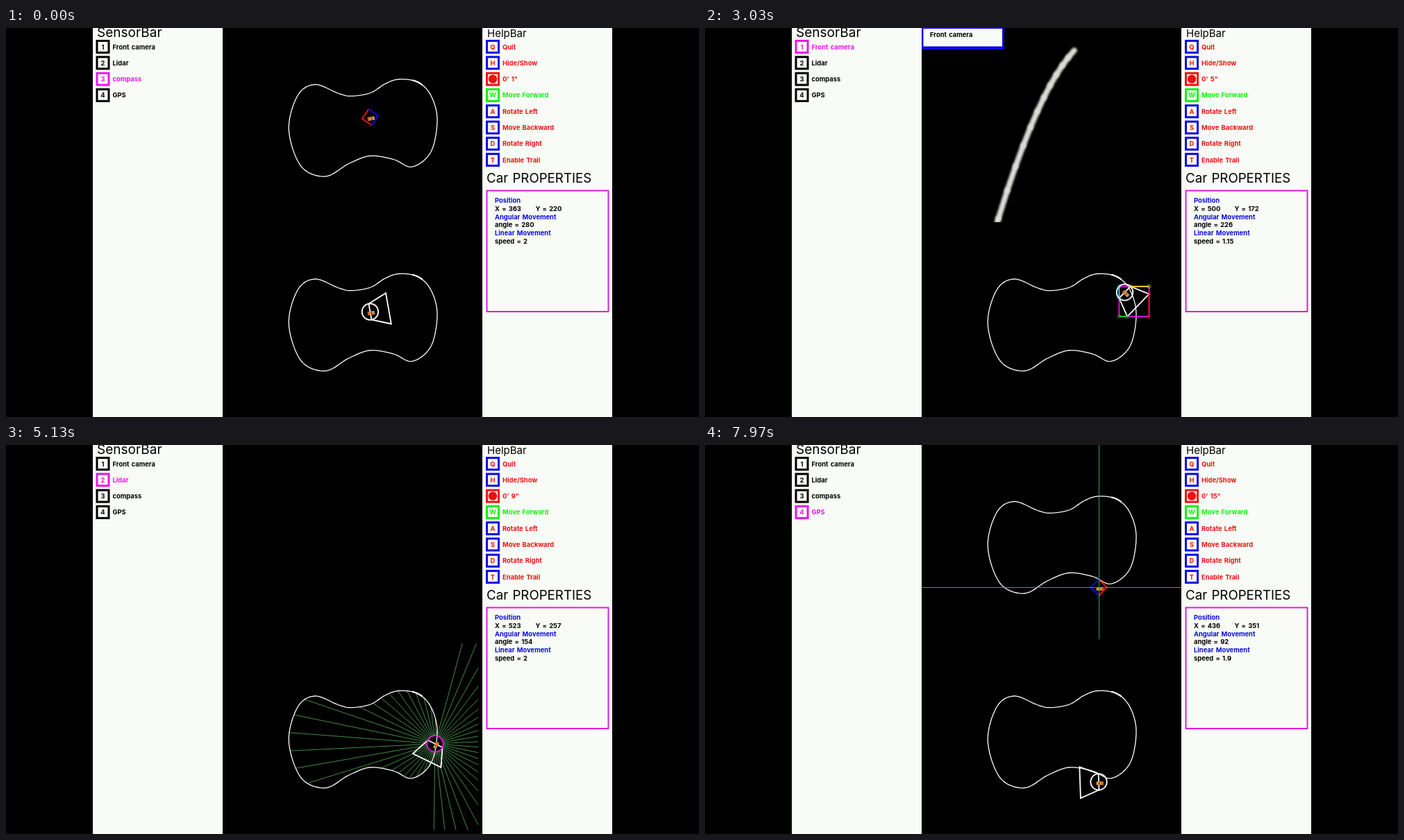
Animation, 998 px wide and 561 px high, one loop 8000 ms. Source, as an HTML page with a canvas:

```html
<!DOCTYPE html>
<html>
<head>
<meta charset="utf-8">
<style>
  html, body { margin: 0; width: 100%; height: 100%; overflow: hidden; background: #000; }
  canvas { display: block; }
</style>
</head>
<body>
<canvas id="stage" width="998" height="561"></canvas>
<script>
const ctx = document.getElementById('stage').getContext('2d');
const LOOP = 8000, SCALE = 0.585, LEFT = 312, RIGHT = 686, MIDDLE = 280.5;
const TURN_RATE = 0.06; // degrees per ms
const WHITE = '#fff', PAPER = '#f9fcf6', BLACK = '#000', BLUE = '#0a0ae2', RED = '#ee1212',
      GREEN = '#10f210', MAGENTA = '#ec14ec', PANEL = '#dc1edc', RAY = '#4b9c4d';
const CORNER_COLORS = ['#10e0e0', '#f2ea10', RED, '#10d820'];

// Key points of the track in the lower view, clockwise
const outline = [
  [445, 362], [478, 374.5], [497, 378.7], [525, 374], [546, 361], [566, 354.5], [593, 358.5],
  [612, 378], [621, 413], [612, 459], [585, 480.7], [558, 470], [524, 465], [493, 476.5],
  [460, 494.5], [425, 480], [407.3, 427], [420, 378]];

// The car drives smoothly between these stops; the turn to the next angle begins at turnFrom
const stops = [
  { t: 0, X: 363, Y: 220, angle: 280, speed: 2, clock: 1.5, turnFrom: 100 },
  { t: 1430, X: 425, Y: 171, angle: 310, speed: 2, clock: 3.5, turnFrom: 1530 },
  { t: 3030, X: 500, Y: 172, angle: 226, speed: 1.15, clock: 5.6, turnFrom: 3600 },
  { t: 4070, X: 522, Y: 198, angle: 202, speed: 1.1, clock: 8.2, turnFrom: 4200 },
  { t: 5130, X: 523, Y: 257, angle: 154, speed: 2, clock: 9.4, turnFrom: 5600 },
  { t: 5900, X: 505, Y: 292, angle: 172, speed: 2, clock: 10.6, turnFrom: 6450 },
  { t: 7970, X: 436, Y: 351, angle: 92, speed: 1.9, clock: 15.4 }];

const CAMERA = 1, LIDAR = 2, COMPASS = 3, GPS = 4;
const modes = [[0, COMPASS], [560, LIDAR], [1130, CAMERA], [3700, LIDAR], [6270, COMPASS], [7700, GPS]];

const mix = (a, b, k) => a + (b - a) * k;
const radians = degrees => degrees * Math.PI / 180;
const headingOf = angle => radians(270 - angle);

// Hermite path whose tangents follow the heading
function stateAt(t) {
  const i = stops.findLastIndex((stop, n) => stop.t <= t && n < stops.length - 1);
  const a = stops[i], b = stops[i + 1], k = (t - a.t) / (b.t - a.t);
  const reach = 1.05 * Math.hypot(b.X - a.X, b.Y - a.Y);
  const along = (axis, trig) => {
    const k2 = k * k, k3 = k2 * k;
    return (2 * k3 - 3 * k2 + 1) * a[axis] + (3 * k2 - 2 * k3) * b[axis] +
      reach * ((k3 - 2 * k2 + k) * trig(headingOf(a.angle)) + (k3 - k2) * trig(headingOf(b.angle)));
  };
  const X = along('X', Math.cos), Y = along('Y', Math.sin);

  const change = b.angle - a.angle, turned = (t - a.turnFrom) * TURN_RATE;
  const turning = turned > 0 && turned < Math.abs(change);
  const angle = a.angle + Math.sign(change) * Math.max(0, Math.min(turned, Math.abs(change)));
  return {
    X, Y, x: LEFT + X * SCALE, y: MIDDLE + Y * SCALE, angle, heading: headingOf(angle),
    activeKey: !turning ? 'W' : change > 0 ? 'A' : 'D',
    speed: Math.round(mix(a.speed, b.speed, k) * 20) / 20,
    seconds: Math.floor(mix(a.clock, b.clock, k)),
    mode: modes.findLast(m => m[0] <= t)[1]
  };
}

function smoothLoop(points, steps) {
  const n = points.length;
  return points.flatMap((p1, i) => {
    const p0 = points[(i + n - 1) % n], p2 = points[(i + 1) % n], p3 = points[(i + 2) % n];
    return Array.from({ length: steps }, (_, s) => {
      const u = s / steps;
      return [0, 1].map(c => p1[c] + 0.5 * u * (p2[c] - p0[c] +
        u * (2 * p0[c] - 5 * p1[c] + 4 * p2[c] - p3[c] + u * (3 * (p1[c] - p2[c]) + p3[c] - p0[c]))));
    });
  });
}
const track = smoothLoop(outline, 10);
const isThick = ([x, y]) => x > 584 && x < 600 && y < 363;

function line(points, color, width, closed) {
  ctx.beginPath();
  points.forEach(p => ctx.lineTo(p[0], p[1]));
  if (closed) ctx.closePath();
  ctx.strokeStyle = color;
  ctx.lineWidth = width;
  ctx.stroke();
}

function ring(x, y, r, color, width) {
  ctx.beginPath();
  ctx.arc(x, y, r, 0, 7);
  ctx.strokeStyle = color;
  ctx.lineWidth = width;
  ctx.stroke();
}

function box(x, y, w, h, color, width) {
  ctx.strokeStyle = color;
  ctx.lineWidth = width;
  ctx.strokeRect(x, y, w, h);
}

function text(string, x, y, color = BLACK, font = '700 9.4px', align = 'left') {
  ctx.font = font + ' Inter, sans-serif';
  ctx.textAlign = align;
  ctx.fillStyle = color;
  ctx.fillText(string, x, y);
}

function fill(x, y, w, h, color) {
  ctx.fillStyle = color;
  ctx.fillRect(x, y, w, h);
}

function drawTrack() {
  line(track, WHITE, 1.3, true);
  line(track.filter(isThick), WHITE, 2.2);
}

function drawCar(car) {
  ctx.save();
  ctx.translate(car.x + 1.5, car.y + 2);
  ctx.rotate(car.heading);
  fill(-5, -2.5, 10, 5, '#dc9448');
  fill(-5, -2.5, 2.5, 5, '#cc6428');
  fill(0, -1.5, 1.5, 3, '#5a3c20');
  ctx.restore();
}

const polar = (car, degrees, r) => [
  car.x + r * SCALE * Math.cos(car.heading + radians(degrees)),
  car.y + r * SCALE * Math.sin(car.heading + radians(degrees))];

function drawTopView(car) {
  ctx.save();
  ctx.translate(0, -MIDDLE);
  drawTrack();
  const [front, right, back, left] = [0, 90, 180, 270].map(d => polar(car, d, 20));
  line([left, back, right], RED, 2);
  line([left, front, right], BLUE, 2);
  drawCar(car);
  ctx.restore();
  if (car.mode === GPS) {
    const x = Math.floor(car.x) + 0.5, y = Math.floor(car.y - MIDDLE) + 0.5;
    line([[x, 0], [x, 280]], RAY, 1);
    line([[LEFT, y], [RIGHT, y]], RAY, 1);
  }
}

function drawLidar(car) {
  const inset = 10 * SCALE, start = 12;
  const bounds = [LEFT + inset, MIDDLE + inset, RIGHT - inset, 561 - inset];
  for (let i = 0; i < 50; i++) {
    const direction = car.heading + radians((i + 0.5) * 7.2);
    const dx = Math.cos(direction), dy = Math.sin(direction);
    let reach = Math.min(
      (bounds[dx > 0 ? 2 : 0] - car.x) / dx,
      (bounds[dy > 0 ? 3 : 1] - car.y) / dy);
    track.forEach((p, j) => {
      const q = track[(j + 1) % track.length];
      const ex = q[0] - p[0], ey = q[1] - p[1], px = p[0] - car.x, py = p[1] - car.y;
      const cross = dx * ey - dy * ex;
      const distance = (px * ey - py * ex) / cross, part = (px * dy - py * dx) / cross;
      if (part >= 0 && part <= 1 && distance > start && distance < reach) reach = distance;
    });
    if (reach > start) {
      line([start, reach].map(d => [car.x + d * dx, car.y + d * dy]), RAY, 0.9);
    }
  }
}

function boundsOf(points) {
  const xs = points.map(p => p[0]), ys = points.map(p => p[1]);
  return [Math.min(...xs), Math.min(...ys), Math.max(...xs), Math.max(...ys)];
}

// The track in perspective, as seen along the heading
function drawCameraView(car, bottom) {
  const c = Math.cos(car.heading), s = Math.sin(car.heading);
  const project = ([x, y]) => {
    const dx = x - car.x, dy = y - car.y;
    const depth = 1 + (dx * c + dy * s) * 0.0343;
    if (depth < 0.5 || y > bottom - 1) return null;
    return [499 + 374 * (dy * c - dx * s - 2) / (50 * depth), 280 - 460 * (1 - 1 / depth)];
  };
  ctx.save();
  ctx.beginPath();
  ctx.rect(LEFT, 0, RIGHT - LEFT, 280);
  ctx.clip();
  ctx.filter = 'blur(1.4px)';
  ctx.lineCap = 'round';
  track.forEach((p, i) => {
    const a = project(p), b = project(track[(i + 1) % track.length]);
    if (a && b) line([a, b], '#dcdcd6', isThick(p) ? 18 : 8);
  });
  ctx.restore();
  fill(LEFT, 0, 119, 31, BLUE);
  fill(314.5, 1, 113.5, 25.5, PAPER);
  text('Front camera', 324, 12.5);
}

function drawCameraBounds(car, view, [x0, y0, x1, y1]) {
  box(x0, y0, x1 - x0, y1 - y0, MAGENTA, 1.7);
  const corners = [[x0, y0], [x1, y0], [x1, y1], [x0, y1]];
  const shift = car.angle >= 270 || car.angle < 90 ? 0 : 2;
  corners.forEach((corner, i) => {
    const vertex = view[(i + shift) % 4];
    line([corner, vertex], CORNER_COLORS[i], 1.7);
    ring(...corner, 2.5, CORNER_COLORS[i], 0.6);
    ring(...vertex, 2.5, CORNER_COLORS[i], 0.6);
  });
}

function drawViews(car) {
  // far left, far right, near right, near left
  const view = [[-40, 60], [40, 60], [90, 20], [-90, 20]].map(([d, r]) => polar(car, d, r));
  const limits = boundsOf(view);
  if (car.mode >= COMPASS) drawTopView(car);
  if (car.mode === CAMERA) drawCameraView(car, limits[3]);
  if (car.mode === LIDAR) drawLidar(car);
  drawTrack();
  line(view, WHITE, 1.8, true);
  if (car.mode === CAMERA) drawCameraBounds(car, view, limits);
  ring(car.x, car.y, 11.7, car.mode === LIDAR ? MAGENTA : WHITE, 1.9);
  drawCar(car);
}

function drawRow(x, row, key, label, keyColor, boxColor, labelColor) {
  const y = 27 + row * 23.3;
  box(x + 1.5, y - 8.5, 17, 17, boxColor, 3);
  text(key, x + 10, y + 3.5, keyColor, '700 9.4px', 'center');
  text(label, x + 24, y + 3.5, labelColor);
}

function drawBars(car) {
  fill(125, 0, 187, 561, PAPER);
  fill(RIGHT, 0, 187, 561, PAPER);

  text('SensorBar', 131, 13, BLACK, '19px');
  ['Front camera', 'Lidar', 'compass', 'GPS'].forEach((label, i) => {
    const color = car.mode === i + 1 ? MAGENTA : BLACK;
    drawRow(129.5, i, i + 1, label, color, color, color);
  });

  text('HelpBar', 693, 13, BLACK, '15px');
  [['Q', 'Quit'], ['H', 'Hide/Show'], ['', `0' ${car.seconds}"`], ['W', 'Move Forward'], ['A', 'Rotate Left'],
   ['S', 'Move Backward'], ['D', 'Rotate Right'], ['T', 'Enable Trail']].forEach(([key, label], i) => {
    const color = key === car.activeKey ? GREEN : RED;
    drawRow(691, i, key, label, color, color === RED && key ? BLUE : color, color);
  });
  ctx.beginPath();
  ctx.arc(701, 73.5, 6.3, 0, 7);
  ctx.fillStyle = RED;
  ctx.fill();

  text('Car PROPERTIES', 692, 223, BLACK, '18.7px');
  box(692.5, 234.5, 175, 174.5, PANEL, 2);
  [['Position', BLUE], ['X = ' + Math.round(car.X)],
   ['Angular Movement', BLUE], ['angle = ' + 2 * Math.round(car.angle / 2)],
   ['Linear Movement', BLUE], ['speed = ' + car.speed]].forEach(([label, color], i) => {
    text(label, 704, 252 + i * 11.8, color);
  });
  text('Y = ' + Math.round(car.Y), 762.5, 263.8);
}

const began = performance.now();
ctx.wordSpacing = '1px';
function frame() {
  const car = stateAt((performance.now() - began) % LOOP);
  fill(0, 0, 998, 561, BLACK);
  drawViews(car);
  drawBars(car);
  requestAnimationFrame(frame);
}
frame();
</script>
</body>
</html>
```
